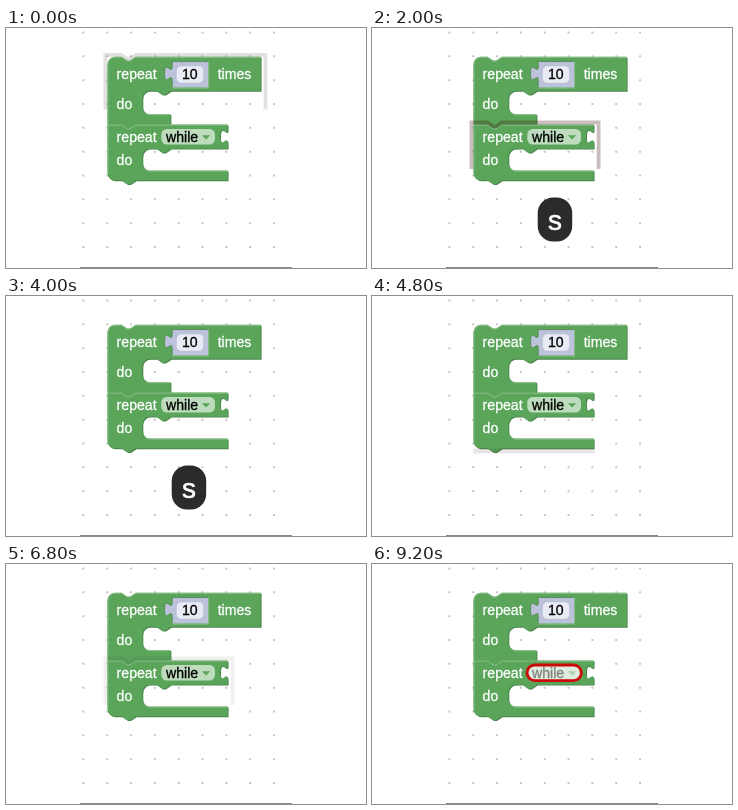
These frames come from a looping animation (360 px wide and 240 px high, 9600 ms). An HTML page:

```html
<!DOCTYPE html>
<html lang="en">
<head>
<meta charset="utf-8">
<title>Block keyboard navigation</title>
<style>
  html, body { margin: 0; width: 100%; height: 100%; overflow: hidden; background: #fff; }
  svg { display: block; width: 360px; height: 240px; }
  text { font: 14.1px "Liberation Sans", Arial, sans-serif; fill: #000; stroke: #000; stroke-width: .3px; }
  .label, .key { fill: #fff; stroke: #fff; }
  .key { font-size: 28px; stroke-width: .6px; text-anchor: middle; }
</style>
</head>
<body>
<svg id="stage" viewBox="0 0 360 240"></svg>
<script>
const NS = "http://www.w3.org/2000/svg";
const stage = document.getElementById("stage");
const LOOP = 9600, STEP = 400;
const GREEN = "#5ba55b", LIGHT = "#8cc08c", DARK = "#498449", RED = "#cc0a0a";

function add(tag, attrs, text) {
  const el = document.createElementNS(NS, tag);
  for (const name in attrs) el.setAttribute(name, attrs[name]);
  if (text) el.textContent = text;
  return stage.appendChild(el);
}
const rect = (x, y, width, height, rx, fill) => add("rect", { x, y, width, height, rx, fill });
const line = (d, stroke, width = 1) => add("path", { d, stroke, fill: "none", "stroke-width": width });
const label = (x, y, text) => add("text", { x, y, class: "label" }, text);

// Shared connector shapes
const LEFT = 101.4, INNER = 136.4, R = 7.4;
const NOTCH_START = 14.1, NOTCH_END = 28.4;
const NOTCH = "l5.7 3.8h2.9l5.7-3.8";
const NOTCH_BACK = "l-5.7 3.8h-2.9l-5.7-3.8";
const TAB_DOWN = "c0 9.5-7.6-7.6-7.6 7.1s7.6-2.4 7.6 7.1";
const TAB_UP = "c0-9.5-7.6 7.6-7.6-7.1s7.6 2.4 7.6-7.1";
const arc = (sweep, dx, dy) => `a${R} ${R} 0 0 ${sweep} ${dx} ${dy}`;

function loopBlock({ top, row, bar, bottom, right, barRight, first, tab }) {
  const start = first ? `M${LEFT} ${top + R}${arc(1, R, -R)}` : `M${LEFT} ${top}`;
  const end = first ? `H${LEFT}` : `H${LEFT + R}${arc(1, -R, -R)}`;
  const d = `${start}H${LEFT + NOTCH_START}${NOTCH}H${right}${tab ? `V${top + 4.6}${TAB_DOWN}` : ""}V${row}` +
    `H${INNER + NOTCH_END}${NOTCH_BACK}H${INNER + R}${arc(0, -R, R)}V${bar - R}${arc(0, R, R)}` +
    `H${barRight}V${bottom}H${LEFT + NOTCH_END}${NOTCH_BACK}${end}Z`;
  add("path", { d, fill: DARK, transform: "translate(.9 .9)" });
  add("path", { d, fill: GREEN });
  const edge = first
    ? `M${LEFT + 0.5} ${bottom - 1}V${top + R}${arc(1, R, -R + 0.5)}`
    : `M${LEFT + 0.5} ${bottom - R}V${top + 0.5}`;
  line(`${edge}H${LEFT + NOTCH_START}${NOTCH}H${right - 0.5}`, LIGHT);
  line(`M${INNER + 2} ${bar - 2.5}Q${INNER + 4} ${bar + 0.5} ${INNER + R} ${bar + 0.5}H${barRight - 0.5}`, LIGHT);
}

function drawScene() {
  for (let i = 0; i < 9; i++)
    for (let j = 0; j < 10; j++)
      rect(76.4 + i * 23.83, 3.5 + j * 23.83, 2, 2, 0.5, "#c4c4c4");
  rect(74, 239, 212, 1, 0, "#888");

  loopBlock({ top: 28.8, row: 62.8, bar: 86.2, bottom: 96.6, right: 254.7, barRight: 164.5, first: true });
  loopBlock({ top: 96.6, row: 120.7, bar: 142.6, bottom: 152.3, right: 221.7, barRight: 221.7, tab: true });

  const socket = `M166.2 33.6H202.2V59.6H166.2V52.6${TAB_UP}Z`;
  add("path", { d: socket, fill: "#bdc2db" });
  line(`M202.2 33.6H166.2V38.4${TAB_DOWN}V59.6`, DARK, 0.8);
  line("M166.2 60H202.6V33.6", LIGHT, 0.8);
  rect(170.8, 38.3, 26.4, 16.4, 4.5, "#e8eaf4");
  add("text", { x: 176, y: 51.4 }, "10");

  label(110.6, 51, "repeat");
  label(211.7, 51, "times");
  label(110.6, 80.6, "do");
  label(110.6, 113.5, "repeat");
  label(110.6, 137.2, "do");

  rect(155.3, 101, 53.7, 15.6, 5.5, "#bddbbd");
  add("text", { x: 160, y: 113.5 }, "while");
  add("path", { d: "M196 107.2h8.2l-4.1 4.4z", fill: GREEN });
}

const frame = (top, right, foot) =>
  line(`M99.4 ${foot}V${top}H${LEFT + NOTCH_START}${NOTCH}H${right}V${foot}`, RED, 3.8);

drawScene();
const topCursor = frame(26.8, 259.5, 81.5);
const lowCursor = frame(94.5, 226.6, 141.1);
const nextCursor = rect(101.2, 152.6, 121.4, 4.7, 0, RED);
const fieldCursor = add("rect", {
  x: 155, y: 101, width: 54.4, height: 15.6, rx: 7.8,
  fill: "rgba(255,255,255,.5)", stroke: RED, "stroke-width": 2.9
});
const keyBox = rect(165.7, 169.5, 34, 44, 15.5, "#2b2b2d");
const keyText = add("text", { y: 202.3, class: "key" });

// Each move restarts the blink; phase is its position in the 1 s cycle at that moment
const moves = [
  { at: 0, cursor: topCursor, phase: 0.44, paint: "stroke" },
  { at: 2000, cursor: lowCursor, phase: 0.37, paint: "stroke", key: "s", width: 34.5 },
  { at: 3600, cursor: nextCursor, phase: 0.25, paint: "fill", key: "s", width: 34.5 },
  { at: 5600, cursor: lowCursor, phase: 0.27, paint: "stroke", key: "w", width: 41.5 },
  { at: 7600, cursor: fieldCursor, key: "d", width: 36 }
];
const cursors = [topCursor, lowCursor, nextCursor, fieldCursor];
const KEY_TIME = 1200;

const show = (el, on) => el.setAttribute("visibility", on ? "visible" : "hidden");

// Red fades through dark to transparent in half a cycle, then stays hidden
function blink(move, elapsed) {
  const phase = (move.phase + elapsed / 1000) % 1;
  const a = Math.max(0, 1 - 2 * phase);
  move.cursor.setAttribute(move.paint, `rgba(${204 * a},${10 * a},${10 * a},${a})`);
}

function render(time) {
  const t = Math.floor((time % LOOP) / STEP) * STEP;
  const move = moves.filter(m => m.at <= t).pop();
  const elapsed = t - move.at;
  cursors.forEach(c => show(c, c === move.cursor));
  if (move.paint) blink(move, elapsed);

  const pressed = Boolean(move.key) && elapsed < KEY_TIME;
  show(keyBox, pressed);
  show(keyText, pressed);
  if (pressed) {
    keyBox.setAttribute("width", move.width);
    keyText.setAttribute("x", 165.7 + move.width / 2);
    keyText.textContent = move.key;
  }
}

const began = performance.now();
function tick() {
  render(performance.now() - began);
  requestAnimationFrame(tick);
}
tick();
</script>
</body>
</html>
```
